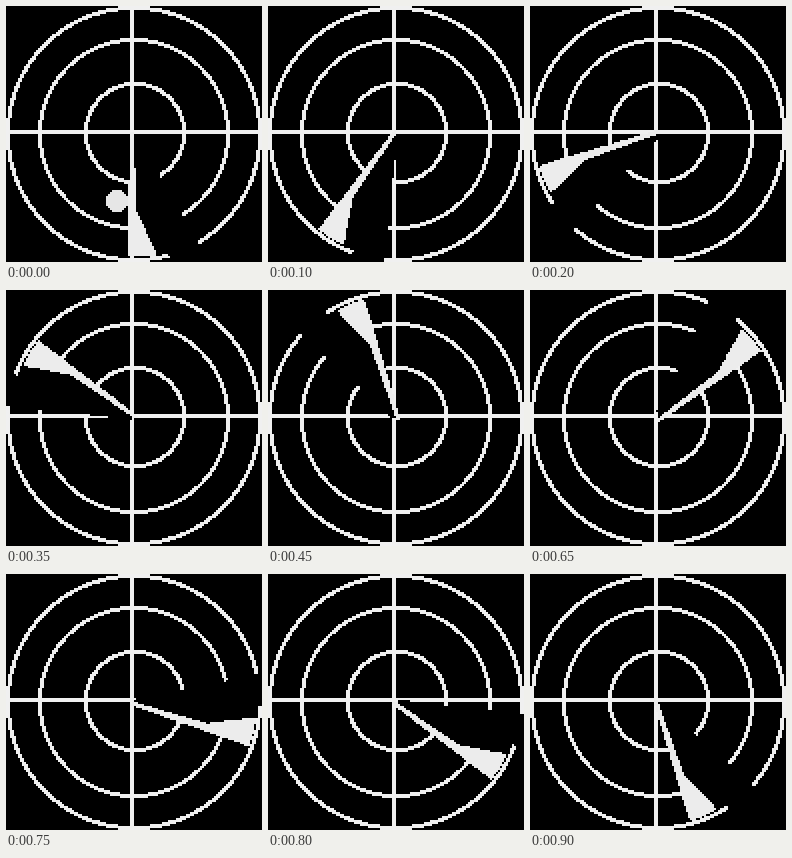
Recreate the animation shown at these times as an HTML page with a canvas. Size 256 by 256 pixels, loop 0.95 s.

```html
<!DOCTYPE html>
<html lang="en">
<head>
<meta charset="utf-8">
<title>Radar sweep</title>
<style>
  html, body { margin: 0; width: 100%; height: 100%; overflow: hidden; background: #000; }
  canvas { display: block; width: 100%; height: 100%; image-rendering: pixelated; }
</style>
</head>
<body>
<canvas id="radar" width="128" height="128"></canvas>
<script>
const SIZE = 128, MID = 63.5, STEP_MS = 50, STEPS = 19;
const INNER = 24.6, MIDDLE = 47, OUTER = 63;
const LINE = '#f0f0f0', BEAM = '#ececec', BLIP = '#e6e6e6';
const ctx = document.getElementById('radar').getContext('2d');

const onRing = (r, radius) => Math.abs(r - radius) < 1;

// Beam extent on each side of its axis; the rear side flares near the rim
const beamFront = r => 2 + r * 0.022;
const beamRear = r => r < 38 ? r * 0.03 : 1.1 + (r - 38) * 0.45;

// Angle behind the beam at which the dark trail ends
const trailEnd = r => Math.min(65, 30 + 30 / r + 300 / (r * r));

function inTrail(r, behind) {
  if (behind >= trailEnd(r)) return false;
  if (onRing(r, OUTER)) return behind > 16;
  if (onRing(r, MIDDLE)) return behind > 6.5;
  return true;
}

function cellColor(x, y, lead, step) {
  const dx = x - MID, dy = y - MID, r = Math.hypot(dx, dy);
  const angle = Math.atan2(dy, dx) * 180 / Math.PI;
  const behind = ((lead - angle) % 360 + 360) % 360;
  const rad = behind * Math.PI / 180;
  const along = r * Math.cos(rad), side = r * Math.sin(rad);

  if (along > -1 && r < 61.5 && side > -beamFront(r) && side < beamRear(r)) return BEAM;
  if (step === 0 && Math.hypot(x - 55, y - 97) < 5.6) return BLIP;
  const onAxis = v => v === 62 || v === 63;
  const grid = onAxis(x) || onAxis(y) || onRing(r, OUTER) || onRing(r, MIDDLE) ||
    onRing(Math.hypot(dx - 0.5, dy + 0.5), INNER);
  return grid && !inTrail(r, behind) ? LINE : null;
}

function draw(step) {
  // The sweep turns 18 degrees per step, with one double step
  const lead = 90 + 18 * (step + (step > 14 ? 1 : 0));
  ctx.fillStyle = '#000';
  ctx.fillRect(0, 0, SIZE, SIZE);
  for (let y = 0; y < SIZE; y++) {
    for (let x = 0; x < SIZE; x++) {
      const color = cellColor(x, y, lead, step);
      if (!color) continue;
      ctx.fillStyle = color;
      ctx.fillRect(x, y, 1, 1);
    }
  }
}

let start = null, shown = -1;
function tick(now) {
  if (start === null) start = now;
  const step = Math.floor((now - start) / STEP_MS) % STEPS;
  if (step !== shown) draw(shown = step);
  requestAnimationFrame(tick);
}
draw(0);
requestAnimationFrame(tick);
</script>
</body>
</html>
```
